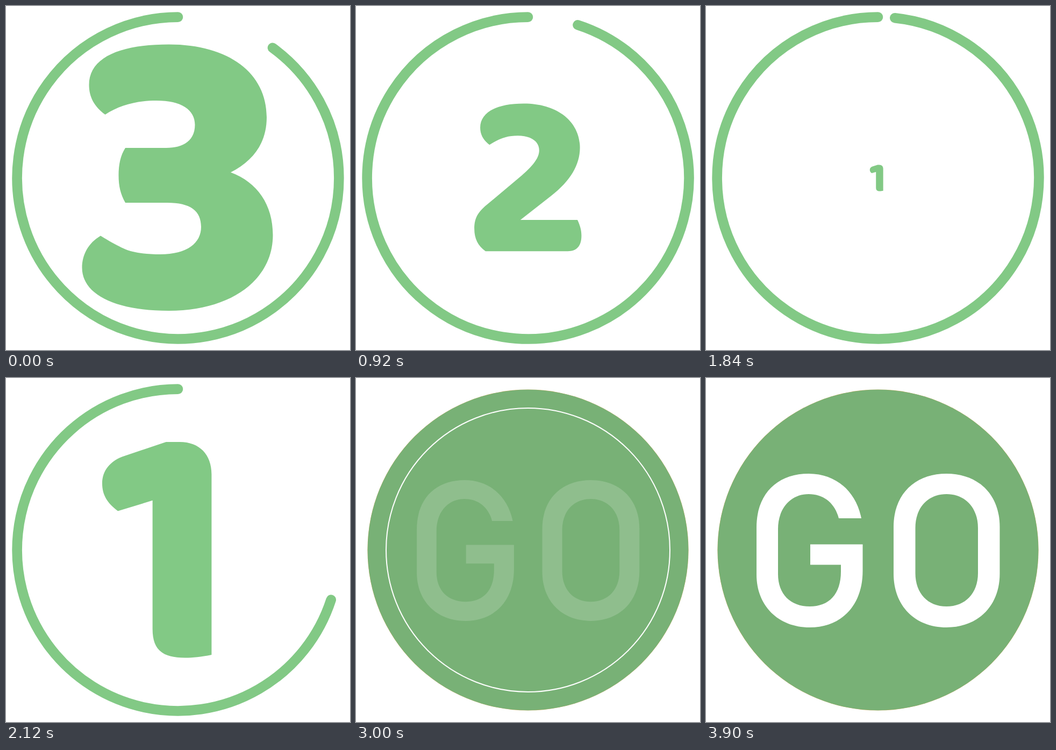
Recreate the animation shown at these times as an HTML page. Size 640 px wide and 640 px high, loop 4000 ms.

```html
<!DOCTYPE html>
<html lang="en">
<head>
<meta charset="utf-8">
<title>Countdown</title>
<style>
  html, body { margin: 0; width: 100%; height: 100%; overflow: hidden; background: #fff; }
  svg { display: block; width: 100%; height: 100%; }
  #count { color: #82c985; }
  #arc { fill: none; stroke: currentColor; stroke-width: 18.6; stroke-linecap: round; }
  #digit { fill: currentColor; }
  #ripple { fill: none; stroke: #fff; }
  #word { fill: #fff; fill-rule: evenodd; }
</style>
</head>
<body>
<svg viewBox="0 0 640 640" role="img" aria-label="3, 2, 1, GO">
  <g id="count">
    <path id="arc"/>
    <path id="digit"/>
  </g>
  <g id="go">
    <circle cx="320" cy="320" r="298.6" fill="#c3ab5c"/>
    <circle cx="320" cy="320" r="298.3" fill="#78b176"/>
    <circle id="ripple" cx="320" cy="320"/>
    <path id="word" d="M289 261H247C240 233 219 216 191 216C157 216 134 243 134 281V365C134 402 157 425 193 425C229 425 251 402 251 360V347.5H194V309.5H291.5V359C291.5 423 252 464 193 464C134 464 94 423 94 366V278C94 216 132 178 191 178C242 178 279 211 289 261Z
      M447.5 178C506 178 546.5 216 546.5 277V364C546.5 424 506 464 447.5 464C389 464 349 424 349 364V277C349 216 389 178 447.5 178Z
      M447.5 216C413 216 389.5 241 389.5 279V363C389.5 401 413 425 447.5 425C482 425 506 401 506 363V279C506 241 482 216 447.5 216Z"/>
  </g>
</svg>
<script>
const LOOP = 4000, GO_AT = 2800, RADIUS = 299.4;
const $ = id => document.getElementById(id);
const [count, arc, digit, go, ripple, word] =
  ['count', 'arc', 'digit', 'go', 'ripple', 'word'].map($);

// Each outline is drawn at the size it has at tick `at` of its second.
const digits = [
  { at: 6, d: 'M184.5 202C164 187 154.5 169 154.5 147C154.5 96 211 71.5 303 71.5C415 71.5 485 125 485 207C485 255 460 288 418 309.5C468 328 496.5 370 496.5 426C496.5 510 418 567 303 567C200 567 141.5 535 141.5 487C141.5 463 153 441 176 427.5C209 448 226 455 236 457C250 460.5 268 462 287 462C337 462 363 441 363 411C363 381 343 366 300 366H222C213 350 209.5 335 209.5 315C209.5 295 213 278 222 264H298C332 264 351.5 249 351.5 221C351.5 193 326 176 280 176C244 176 212 184 184.5 202Z' },
  { at: 18, d: 'M217.5 232.5C201 220 193 205 193 187C193 148 234 123.5 308 123.5C398 123.5 456 172 456 240C456 285 431 328 380 367L299 430.5H449.5C457 446 460 459 460 472C460 500 447 513 424 513H207C187 499 177.5 480 177.5 454C177.5 427 186 411 210 391L303 313C336 284 348.5 265 348.5 247C348.5 223 326 208.5 292 208.5C266 208.5 247 214 217.5 232.5Z' },
  { at: 48, d: 'M298 120.5H323C360 120.5 382 144 382 180V513.5C362 517.5 348 519 333 519C292 519 273 505 273 466V228.5L209 248C190 234 180 219 180 197C180 174 194 155 222 146Z' }
];

const clamp = x => Math.min(1, Math.max(0, x));
const smooth = x => (x = clamp(x), x * x * (3 - 2 * x));
const scaleAt = (cx, cy, s) =>
  `translate(${cx} ${cy}) scale(${s}) translate(${-cx} ${-cy})`;

// Damped spring from 0 to 1, in ticks of 1/60 second.
function spring(u, w = 0.488, k = 0.236) {
  return 1 - Math.exp(-k * u) * (Math.cos(w * u) + k / w * Math.sin(w * u));
}

function drawCount(t) {
  const tick = Math.floor(6 + 2.5 * Math.floor(t / 40));
  const u = tick % 60;
  const glyph = digits[Math.floor(tick / 60)];
  const a = u * Math.PI / 30;
  const x = 320 + RADIUS * Math.sin(a), y = 320 - RADIUS * Math.cos(a);
  arc.setAttribute('d',
    `M${x} ${y}A${RADIUS} ${RADIUS} 0 ${u < 30 ? 1 : 0} 1 320 ${320 - RADIUS}`);
  digit.setAttribute('d', glyph.d);
  digit.setAttribute('transform', scaleAt(322.3, 320, spring(u) / spring(glyph.at)));
}

function drawGo(t) {
  t = Math.floor(t / 100) * 100;
  const p = (t - GO_AT + 50) / 250;
  ripple.setAttribute('r', 264 * (1 - (1 - clamp(p)) ** 3));
  ripple.setAttribute('stroke-width', 2 + 50 * (1 - clamp(p)));
  ripple.style.display = p > 1 ? 'none' : '';

  const size = t < 3500
    ? 0.904 + 0.153 * smooth((t - 2900) / 600)
    : 1.057 - 0.057 * smooth((t - 3500) / 400);
  word.setAttribute('transform', scaleAt(320, 321, size));
  word.setAttribute('opacity', clamp((t - 2915) / 500));
}

const start = performance.now();
function frame() {
  const t = (performance.now() - start) % LOOP;
  const counting = t < GO_AT;
  count.style.display = counting ? '' : 'none';
  go.style.display = counting ? 'none' : '';
  (counting ? drawCount : drawGo)(t);
  requestAnimationFrame(frame);
}
frame();
</script>
</body>
</html>
```
